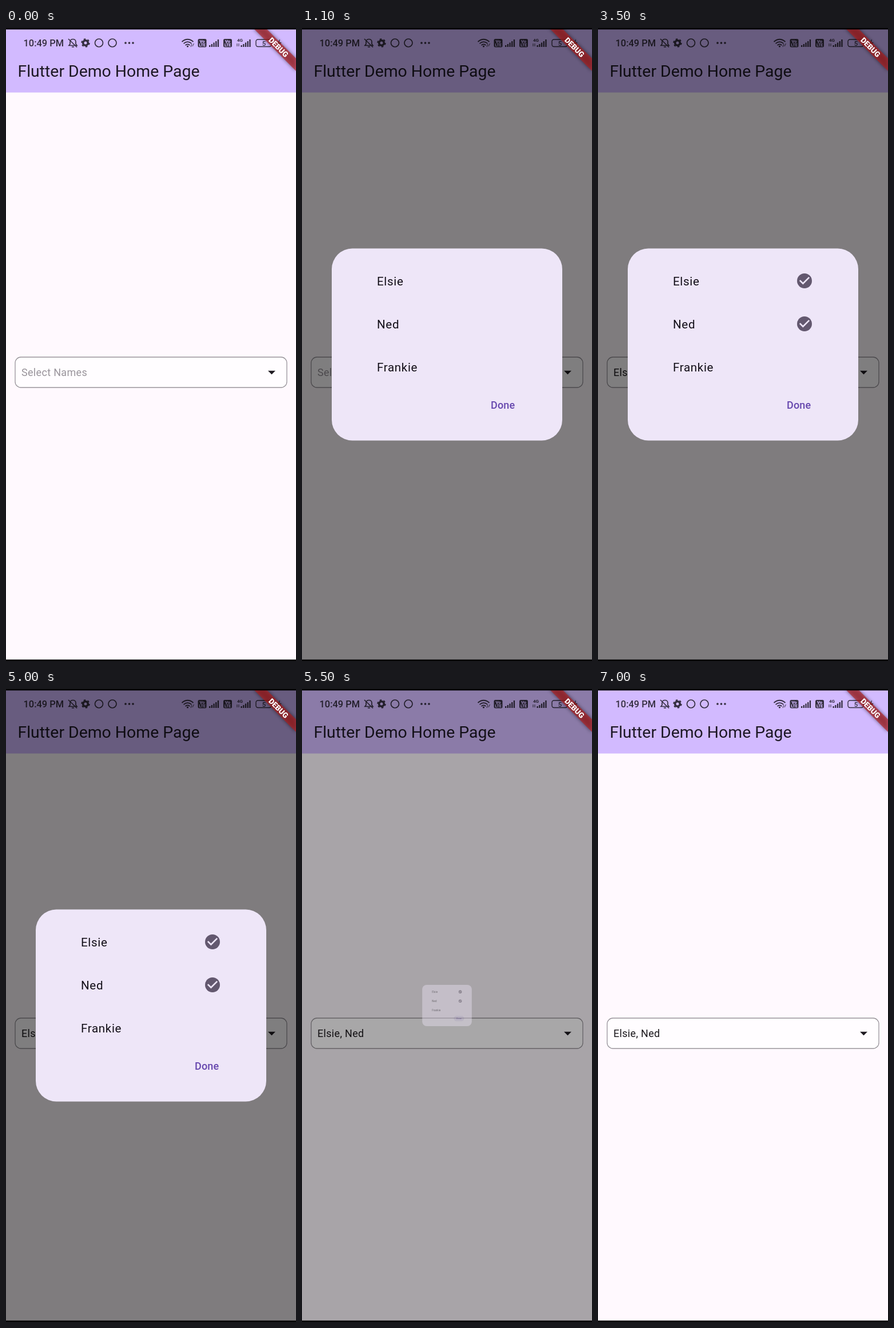
These frames come from a looping animation (507 by 1104 pixels, 7.1 s). An HTML page:

```html
<!DOCTYPE html>
<html lang="en">
<head>
<meta charset="utf-8">
<title>Multi-select dialog</title>
<style>
  html, body { margin: 0; height: 100%; overflow: hidden; background: #000; }
  svg { display: block; width: 100%; height: 100%; font-family: Roboto, sans-serif; }
  .status { opacity: .75; }
  .line { fill: none; stroke: #000; stroke-width: 1.7; }
  .cut { fill: #d2baff; font-weight: 900; text-anchor: middle; }
  .option { font-size: 20.6px; letter-spacing: .64px; fill: #120e17; }
</style>
</head>
<body>
<svg viewBox="0 0 507 1104">
  <defs>
    <filter id="blur" x="-20%" y="-20%" width="140%" height="140%"><feGaussianBlur stdDeviation="3.4"/></filter>
    <path id="ribbon" d="M432 0H454L507 53V75Z"/>
    <g id="volte">
      <rect y="19" width="15" height="14.5" rx="2.5"/>
      <text class="cut" x="7.5" y="26" font-size="7.5">Vo</text>
      <text class="cut" x="7.5" y="32.3" font-size="6.8">LTE</text>
    </g>
    <path id="bars" d="M0 33V30h2.3v3zM3.7 33V28H6v5zM7.4 33V25.500h2.300V33zM11.100 33V23h2.300V33zM14.800 33V20h2.300V33z"/>
    <g id="check">
      <circle cx="12" cy="12" r="10" fill="#63586f"/>
      <path d="M10 17l-5-5 1.410-1.410L10 14.170l7.590-7.590L19 8z" fill="#eee6f8"/>
    </g>
  </defs>

  <rect width="507" height="1104" fill="#fff9fe"/>
  <rect width="507" height="112.500" fill="#d2baff"/>
  <text x="20.500" y="85" font-size="28.400" fill="#1d1824">Flutter Demo Home Page</text>

  <g class="status">
    <text x="30.500" y="32" font-size="16.400" font-weight="500">10:49 PM</text>
    <path class="line" stroke-width="1.500" d="M110 30.500h14l-2-2.500v-4c0-6-10-6-10 0v4zM115 33h4M109 19l15 14.500"/>
    <circle cx="139" cy="26" r="4.300" fill="none" stroke="#000" stroke-width="3.600"/>
    <circle cx="139" cy="26" r="6.700" fill="none" stroke="#000" stroke-width="2" stroke-dasharray="3.500 3.516"/>
    <circle class="line" cx="162.500" cy="26" r="7"/>
    <circle class="line" cx="186" cy="26" r="7"/>
    <path d="M209 26h0m6.500 0h0m6.500 0h0" stroke="#000" stroke-width="3.700" stroke-linecap="round"/>
    <path class="line" d="M307.500 24q10-8.500 20 0M310.500 27.200q7-6 14 0M313.500 30.200q4-3.500 8 0"/>
    <circle cx="317.500" cy="32" r="1.600"/>
    <path class="line" style="stroke-width:1" d="M323 33l2-5M326 32l2.500-5"/>
    <use href="#volte" x="335.500"/>
    <use href="#bars" x="355"/>
    <use href="#volte" x="380"/>
    <text x="404" y="24" font-size="8" font-weight="700">4G</text>
    <path class="line" style="stroke-width:1" d="M404 27v5M407 27v5"/>
    <use href="#bars" x="410.500"/>
    <rect class="line" style="stroke-width:1.400" x="437" y="20" width="27" height="12.500" rx="3.500"/>
    <text x="451" y="30.500" font-size="11.500" font-weight="500" text-anchor="middle">5</text>
    <path d="M479 19l-5 8h3.500l-1 6 5-8h-3.500z"/>
  </g>

  <rect x="16" y="574" width="475" height="53" rx="10" fill="#fffdff" stroke="#99959b" stroke-width="1.300"/>
  <text id="field" x="27" y="607" font-size="18" letter-spacing=".32"></text>
  <path d="M458 597.800h13l-6.500 6.500z" fill="#1f1b21"/>

  <rect id="barrier" width="507" height="1104"/>

  <g id="dialog">
    <rect x="52" y="384.500" width="403" height="335" rx="36" fill="#eee6f8"/>
    <g id="options"></g>
    <rect id="press" x="309" y="636" width="84" height="44" rx="22" fill="#6647ae" opacity=".16"/>
    <text x="330" y="664" font-size="18" font-weight="500" letter-spacing=".13" fill="#6647ae">Done</text>
  </g>

  <use href="#ribbon" filter="url(#blur)" opacity=".5"/>
  <use href="#ribbon" fill="#b71c1c" fill-opacity=".63"/>
  <text transform="translate(476.500 33.500) rotate(45)" y="4.700" font-size="13.200" font-weight="900" fill="#fff" text-anchor="middle">DEBUG</text>
  <path d="M0 0H507V2.500H0zM0 1101.500H507V1104H0z"/>
</svg>
<script>
const LOOP = 7100, STEP = 100, FADE = 200;
const OPEN = 614, PRESS = 5200, CLOSE = 5380;
const options = [
  { name: 'Elsie', picked: 2000 },
  { name: 'Ned', picked: 3500 },
  { name: 'Frankie', picked: Infinity }
];

const $ = id => document.getElementById(id);
const clamp = v => Math.min(1, Math.max(0, v));

function bezier(x1, y1, x2, y2) {
  const at = (a, b, s) => 3 * a * s * (1 - s) ** 2 + 3 * b * s * s * (1 - s) + s ** 3;
  return x => {
    if (x <= 0 || x >= 1) return clamp(x);
    let lo = 0, hi = 1;
    for (let i = 0; i < 24; i++) {
      const mid = (lo + hi) / 2;
      if (at(x1, x2, mid) < x) lo = mid; else hi = mid;
    }
    return at(y1, y2, lo);
  };
}
const ease = bezier(.25, .1, .25, 1);
const easeOut = bezier(0, 0, .58, 1);
const easeIn = bezier(.42, 0, 1, 1);

$('options').innerHTML = options.map(({ name }, i) => {
  const y = 441 + 75 * i;
  return `<text class="option" x="131" y="${y + 8}">${name}</text>
    <use id="check${i}" href="#check" transform="translate(345.400 ${y - 15.6}) scale(1.300)"/>`;
}).join('');

function draw(time) {
  const closing = time >= CLOSE;
  const progress = clamp(closing ? 1 - (time - CLOSE) / FADE : (time - OPEN) / FADE);
  const scale = (closing ? easeIn : easeOut)(progress);

  $('barrier').setAttribute('opacity', .5 * ease(progress));
  $('dialog').setAttribute('opacity', progress);
  $('dialog').setAttribute('transform',
    `translate(253.5 552) scale(${scale}) translate(-253.5 -552)`);
  $('press').style.display = time >= PRESS ? '' : 'none';

  const picked = options.filter(o => time >= o.picked).map(o => o.name);
  options.forEach((o, i) => $('check' + i).style.display = time >= o.picked ? '' : 'none');
  $('field').textContent = picked.join(', ') || 'Select Names';
  $('field').setAttribute('fill', picked.length ? '#1b181c' : '#99949b');
}

const start = performance.now();
function tick() {
  const time = (performance.now() - start) % LOOP;
  draw(Math.floor(time / STEP) * STEP);
  requestAnimationFrame(tick);
}
tick();
</script>
</body>
</html>
```
